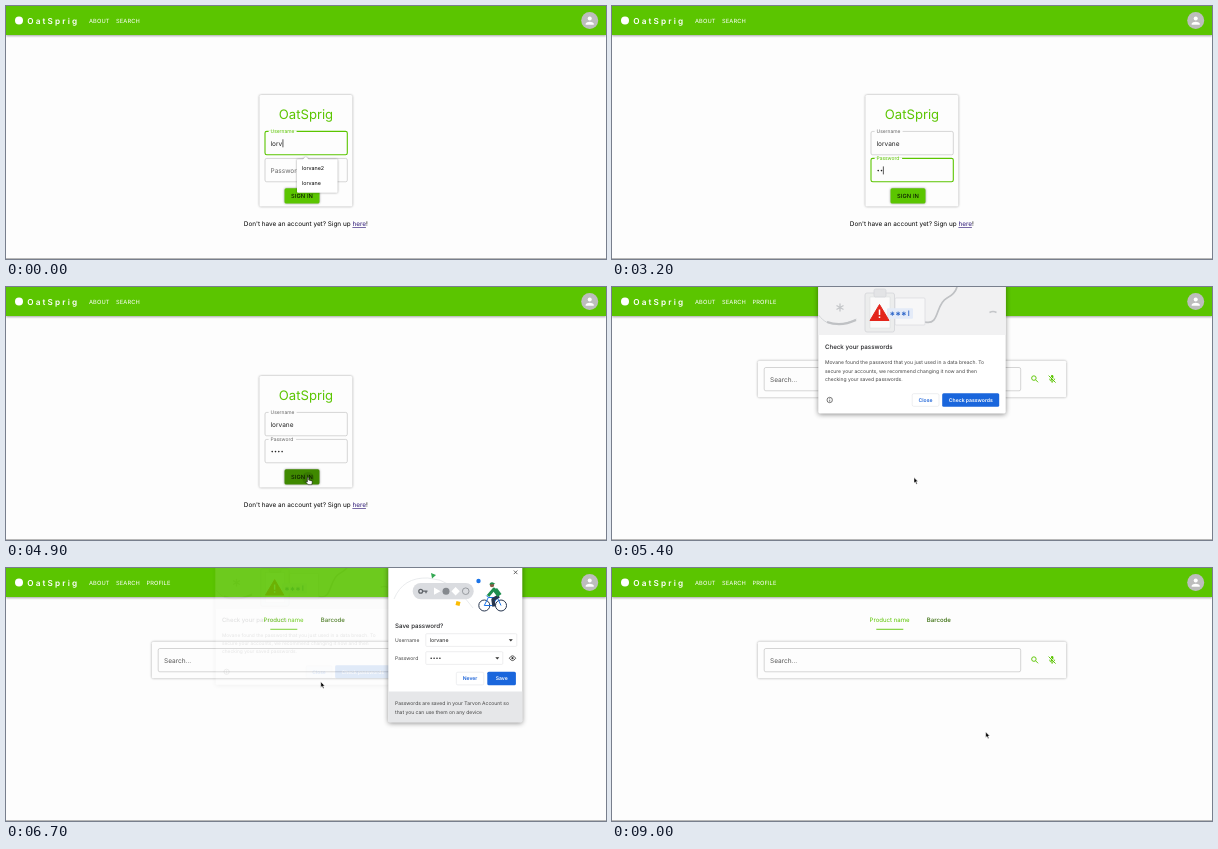
An HTML page that plays this animation: 600x253 px, repeating every 9.5 s.

```html
<!DOCTYPE html>
<html lang="en">
<head>
<meta charset="utf-8">
<title>Sign in</title>
<style>
  html, body { margin: 0; width: 100%; height: 100%; overflow: hidden; background: #fdfdfd; }
  svg {
    display: block; width: 100vw; height: 100vh; text-rendering: geometricPrecision;
    font: 400 6.5px Inter, "Liberation Sans", sans-serif;
  }
  .card { fill: #fdfdfd; filter: drop-shadow(0 .9px .8px rgba(0, 0, 0, .38)); }
  .pop { fill: #fff; filter: drop-shadow(0 1px 2.5px rgba(0, 0, 0, .45)); }
  .hint { filter: drop-shadow(0 .5px 1px rgba(0, 0, 0, .4)); }
  .box { fill: none; stroke: #b9b9b9; stroke-width: .6; }
  .line { stroke: #e2e3e5; }
  .nav { font-size: 5.74px; fill: #fff; letter-spacing: .1px; }
  .label { font-size: 4.92px; fill: #666; }
  .tab { font-size: 6.05px; }
  .small { font-size: 5.02px; fill: #444; }
  .btn { font-size: 5.1px; font-weight: 600; text-anchor: middle; fill: #1a62d8; }
  .on { fill: #fff; }
  .ttl { font-size: 6.2px; font-weight: 500; fill: #202124; }
  .icon { fill: none; stroke: #5bc500; stroke-width: 2.3; }
  .focus { stroke: #5bc500; stroke-width: 1.1; }
</style>
</head>
<body>
<svg viewBox="0 0 600 253" preserveAspectRatio="none">
  <rect width="600" height="253" fill="#fdfdfd"/>
  <rect y="252" width="600" height="1" fill="#b8b8b8"/>

  <rect width="600" height="29" fill="#5bc500" style="filter:drop-shadow(0 1px 1px rgba(0,0,0,.35))"/>
  <circle cx="13" cy="14.6" r="4" fill="#fff"/>
  <text x="21.2" y="17.6" fill="#fff" font-size="8.2" font-weight="600" letter-spacing="2.15">OatSprig</text>
  <g class="nav">
    <text x="83" y="16.8">ABOUT</text>
    <text x="110" y="16.8">SEARCH</text>
    <text id="profile" x="140.4" y="16.8">PROFILE</text>
  </g>
  <circle cx="583.7" cy="14.6" r="8.5" fill="#bdbdbd"/>
  <g transform="translate(577.6 8.5) scale(.51)" fill="#fff">
    <circle cx="12" cy="8" r="4"/>
    <path d="M12 14c-2.7 0-8 1.3-8 4v2h16v-2c0-2.7-5.3-4-8-4z"/>
  </g>

  <g id="login">
    <rect class="card" x="253.4" y="89" width="93" height="111.5" rx="1.5"/>
    <text x="300" y="113.2" text-anchor="middle" fill="#5bc500" font-size="13.1">OatSprig</text>

    <rect id="userBox" class="box" x="259" y="125.4" width="82.3" height="23.4" rx="1.7"/>
    <rect x="262.6" y="124.5" width="28" height="2" fill="#fdfdfd"/>
    <text id="userLabel" class="label" x="264.5" y="127.3">Username</text>
    <text id="user" x="264.5" y="139.8" fill="#222"></text>

    <rect id="passBox" class="box" x="259" y="152.4" width="82.3" height="23.4" rx="1.7"/>
    <rect id="notch" x="262.6" y="151.5" width="27.5" height="2" fill="#fdfdfd"/>
    <text id="passLabel" class="label" x="264.5">Password</text>
    <g id="dots" fill="#222"></g>
    <rect id="caret" width=".7" height="8" fill="#111"/>

    <rect id="sign" x="278.5" y="182.2" width="35" height="15.4" rx="1.7" style="filter:drop-shadow(0 .8px .8px rgba(0,0,0,.4))"/>
    <circle id="ripple" cx="302" cy="191" r="5" fill="#235500" opacity="0"/>
    <text x="296" y="192" text-anchor="middle" font-size="5.74" font-weight="500" letter-spacing=".12" fill="#0c1a00">SIGN IN</text>
    <text x="237.8" y="220" font-size="6.4">Don't have an account yet? Sign up <tspan fill="#2f1a78" text-decoration="underline">here</tspan>!</text>

    <g id="hints">
      <path class="pop hint" d="M292 153.3h5l2.8-2.6 2.8 2.6h28a1 1 0 0 1 1 1v31.4a1 1 0 0 1-1 1h-38.600a1 1 0 0 1-1-1v-31.400a1 1 0 0 1 1-1z"/>
      <text x="296" y="164.3" font-size="5.35">lorvane2</text>
      <text x="296" y="179.3" font-size="5.35">lorvane</text>
    </g>
  </g>

  <g id="search">
    <text class="tab" x="257.6" y="53.9" fill="#5bc500">Product name</text>
    <text class="tab" x="314.8" y="53.9" fill="#356b08" font-weight="500">Barcode</text>
    <rect x="264.3" y="60.8" width="27" height=".9" fill="#5bc500"/>
    <rect class="card" x="145.8" y="73.8" width="308.4" height="36.4" rx="1.5"/>
    <rect class="box" x="152.2" y="80.5" width="256.5" height="23.3" rx="1.7"/>
    <text x="158" y="94.6" fill="#555">Search...</text>
    <g class="icon" transform="translate(418 87.2) scale(.41)">
      <circle cx="9.5" cy="9.5" r="5.5"/>
      <path d="M13.7 13.7l6 6"/>
    </g>
    <g class="icon" transform="translate(435.2 87.2) scale(.41)">
      <rect x="9" y="2" width="6" height="13" rx="3" fill="#5bc500" stroke="none"/>
      <path d="M6 11a6 6 0 0 0 12 0M12 17v4"/>
      <path d="M4.6 2.6l16 16" stroke="#fdfdfd"/>
      <path d="M3.5 3.5l17 17"/>
    </g>
  </g>

  <g id="dialog">
    <path class="pop" d="M206.3 -4h187.4v128.800a1.600 1.600 0 0 1-1.600 1.600h-184.200a1.600 1.600 0 0 1-1.600-1.600z"/>
    <rect x="206.3" y="-4" width="187.4" height="52" fill="#f1f1f2"/>
    <g fill="none" stroke="#d3d5d8">
      <path d="M206.5 28c10 13 22 11 38 4"/>
      <path d="M215 35q14 5 29-2" stroke="#bfc1c4" stroke-width="2.2"/>
      <path d="M313 35c15 4 10-18 22-24q8-4 10-11" stroke="#bfc1c4" stroke-width="1.7"/>
      <path d="M228 16.5v8M224.5 18.5l7 4M231.5 18.5l-7 4" stroke="#c4c6c9" stroke-width="1.3"/>
      <path d="M377.5 25.5q3.5-2 7 0" stroke="#c4c6c9" stroke-width="1.5"/>
      <rect x="283" y="11" width="30" height="27" rx="1" fill="#f7f7f8" stroke-width=".6"/>
      <rect x="253" y="6" width="29.5" height="39" rx="2" fill="#eceded" stroke-width=".8"/>
      <rect x="258" y="10" width="20" height="31" fill="#fafafa" stroke-width=".4"/>
      <rect x="262" y="2" width="12" height="8" rx="1.5" fill="#e3e4e6" stroke-width=".7"/>
    </g>
    <rect x="275" y="21.3" width="26" height="10.4" rx="1" fill="#e4ebf8"/>
    <text x="277.5" y="32" font-size="10.2" font-weight="700" fill="#2f67c9">***</text>
    <rect x="296.3" y="23.5" width=".9" height="5.5" fill="#2f67c9"/>
    <path d="M267.5 17.5l9.5 16h-19z" fill="#e3261c" stroke="#e3261c" stroke-linejoin="round"/>
    <path d="M267.5 22.5v5.5M267.5 29.6v1.5" stroke="#fff" stroke-width="1.5"/>
    <text class="ttl" x="212.9" y="61.6">Check your passwords</text>
    <g class="small">
      <text x="212.9" y="77">Movane found the password that you just used in a data breach. To</text>
      <text x="212.9" y="85.5">secure your accounts, we recommend changing it now and then</text>
      <text x="212.9" y="94">checking your saved passwords.</text>
    </g>
    <circle cx="217.7" cy="113" r="2.7" fill="none" stroke="#444" stroke-width=".7"/>
    <path d="M217.7 111.3v.8M217.7 112.7v2" stroke="#444" stroke-width=".7"/>
    <rect id="close" x="300.2" y="106.7" width="26.8" height="12.6" rx="1.5" fill="#fff" stroke="#dadce0" stroke-width=".5"/>
    <text class="btn" x="313.5" y="114.9">Close</text>
    <rect x="330.2" y="106.2" width="57" height="13.6" rx="1.5" fill="#1a66dc"/>
    <text class="btn on" x="358.8" y="114.9">Check passwords</text>
  </g>

  <g id="bubble">
    <path class="pop" d="M382.3 -4h134v156.800a1.500 1.500 0 0 1-1.500 1.500h-131a1.500 1.500 0 0 1-1.500-1.500z"/>
    <path d="M382.3 123.5h134v29.300a1.500 1.500 0 0 1-1.500 1.500h-131a1.500 1.500 0 0 1-1.500-1.500z" fill="#e6e7e9"/>
    <path d="M507.8 2.5l3.6 3.6m0-3.6l-3.6 3.6" stroke="#444" stroke-width=".8"/>
    <path d="M388 31q9-22 34-21 25 1 45 30" fill="none" stroke="#e4e6e9" stroke-width=".8"/>
    <rect x="406.7" y="15" width="61" height="16.3" rx="8.1" fill="#dadce0"/>
    <g fill="none" stroke="#5f6368" stroke-width="1.3">
      <circle cx="414.7" cy="23.2" r="1.9"/>
      <path d="M416.5 23.2h5M420 23v2.3"/>
      <circle cx="459.7" cy="23.2" r="3.3" stroke="#888c91" stroke-width=".8"/>
    </g>
    <path d="M428 19.6l6.5 3.6-6.5 3.6zM449.6 19l4.2 4.2-4.2 4.2-4.2-4.2z" fill="#fff"/>
    <circle cx="440" cy="23.2" r="3.5" fill="#85898e"/>
    <path d="M425 5l5 2-4 3.5z" fill="#34a853"/>
    <circle cx="472.5" cy="13" r="2.2" fill="#1a73e8"/>
    <path d="M450.5 33l4 1-1 4-4-1z" fill="#fbbc04"/>
    <g fill="none" stroke="#27364f" stroke-linejoin="round">
      <circle cx="478.3" cy="37.5" r="5.5"/>
      <circle cx="495" cy="37.5" r="5.5"/>
      <path d="M478.3 37.5l4-8h9l-5 8zM482.3 29.5l-2-2M491.3 29.5l3.7 8" stroke="#1a73e8"/>
      <path d="M493 28l-6 3.500 1 7" stroke-width="3.4"/>
      <path d="M493 27l-5-6-6 7" stroke="#1e8e4e" stroke-width="3"/>
      <path d="M493.5 27.500l-4.500-6" stroke="#1e8e4e" stroke-width="5"/>
    </g>
    <circle cx="486" cy="17" r="2.200" fill="#8a5a44"/>
    <path d="M483.2 16.600q2-4.600 6.200-.6z" fill="#1e8e4e"/>

    <text class="ttl" x="389" y="59.5">Save password?</text>
    <g class="small">
      <text x="389" y="74">Username</text>
      <text x="389" y="92">Password</text>
      <text x="389" y="137">Passwords are saved in your Tarvon Account so</text>
      <text x="389" y="145.5">that you can use them on any device</text>
    </g>
    <rect class="box line" x="419.8" y="65.7" width="91" height="12.7" rx="1"/>
    <rect class="box line" x="419.8" y="83.7" width="77" height="12.7" rx="1"/>
    <text x="423.8" y="74" font-size="5.3" fill="#222">lorvane</text>
    <g id="saved" fill="#222"></g>
    <path d="M502.8 71.2h4l-2 2.2zM489.3 89.2h4l-2 2.2z" fill="#333"/>
    <path d="M503.3 90.2q3.200-4.800 6.400 0-3.200 4.800-6.400 0z" fill="none" stroke="#333" stroke-width=".8"/>
    <circle cx="506.5" cy="90.2" r="1.1" fill="#333"/>
    <rect id="never" x="450.3" y="104.2" width="27.5" height="12.7" rx="1.5" fill="#fff" stroke="#dadce0" stroke-width=".5"/>
    <text class="btn" x="464" y="112.4">Never</text>
    <rect x="481.3" y="103.7" width="28.6" height="13.6" rx="1.5" fill="#1a66dc"/>
    <text class="btn on" x="495.7" y="112.4">Save</text>
  </g>

  <g id="cursor" stroke-linejoin="round" stroke-width=".5">
    <path id="arrow" d="M0 0v5.6l1.3-1.2 1 2.3 1-.4-1-2.2h1.7z" fill="#000" stroke="#fff"/>
    <path id="hand" d="M-.6 0q.7-.7 1.3 0v2.6l3 .8q.8.3.6 1.2l-.6 2.6h-3.600l-2.200-2.600q0-1 1-.5l.5.5z" fill="#fff" stroke="#000"/>
  </g>
</svg>
<script>
const LOOP = 9500, STEP = 100, GREEN = '#5bc500';
const $ = id => document.getElementById(id);
const set = (id, attrs) => { for (const k in attrs) $(id).setAttribute(k, attrs[k]); };
const show = (id, on) => set(id, { opacity: +on });
const within = (t, a, b) => t >= a && t < b;
const mix = (a, b, p) => a + (b - a) * p;
const ease = p => p * p * (3 - 2 * p);

const TYPED = [[0, 'lorv'], [500, 'lorva'], [1000, 'lorvan'], [1200, 'lorvane']];
const DOTS = [[0, 0], [2900, 1], [3200, 2], [3400, 3], [3600, 4]];
// time, x, y of the pointer tip
const PATH = [
  [3800, 318, 143], [4300, 306, 179], [4500, 306, 179], [4700, 302, 190.5],
  [5500, 302, 190.5], [6300, 314.8, 113.8], [6700, 314.8, 113.8],
  [7400, 463, 109], [7600, 463, 109], [8200, 373.7, 164]
];
// opacity of the overlays, held from each time on
const DIALOG = [[0, 0], [5300, .6], [5400, 1], [6600, .55], [6700, .12], [6800, 0]];
const BUBBLE = [[0, 0], [6600, .6], [6700, 1], [7600, .4], [7700, 0]];
const FLOAT = [[0, 0], [1900, .3], [2000, .8], [2100, 1]];

const held = (table, t) => table.filter(r => r[0] <= t).pop()[1];

function pointer(t) {
  const i = PATH.findIndex(p => p[0] > t);
  if (i < 0) return PATH[PATH.length - 1].slice(1);
  if (i === 0) return PATH[0].slice(1);
  const [a, b] = [PATH[i - 1], PATH[i]];
  const p = ease((t - a[0]) / (b[0] - a[0]));
  return [mix(a[1], b[1], p), mix(a[2], b[2], p)];
}

function addDots(id, x, y, gap) {
  let s = '';
  for (let i = 0; i < 4; i++) s += `<circle cx="${x + gap * i}" cy="${y}" r=".8"/>`;
  $(id).innerHTML = s;
}

function drawLogin(t) {
  const onUser = t < 1900, onPass = within(t, 1900, 4800);
  $('user').textContent = held(TYPED, t);
  $('userBox').classList.toggle('focus', onUser);
  $('passBox').classList.toggle('focus', onPass);
  $('userLabel').style.fill = onUser ? GREEN : '#666';

  const f = held(FLOAT, t);
  set('passLabel', { y: mix(166.6, 154.3, f) });
  $('passLabel').style.fontSize = mix(6.5, 4.92, f) + 'px';
  $('passLabel').style.fill = onPass ? GREEN : '#666';
  show('notch', f > .5);

  const n = held(DOTS, t);
  [...$('dots').children].forEach((d, i) => d.setAttribute('opacity', +(i < n)));
  show('caret', t < 4800 && !within(t, 2700, 2900) && !within(t, 4200, 4700));
  set('caret', onUser
    ? { x: 264.9 + $('user').getComputedTextLength(), y: 133.3 }
    : { x: 264.5 + n * 3.2, y: 160.4 });
  show('hints', t < 1800);

  set('sign', { fill: t < 4600 ? GREEN : '#3f8900' });
  set('ripple', { opacity: within(t, 4800, 5100) ? .3 : 0, r: within(t, 4800, 4900) ? 3 : 6 });
}

function draw(t) {
  const home = t >= 5100;
  show('login', !home);
  show('search', home);
  show('profile', home);
  if (!home) drawLogin(t);

  const k = t < 6600 ? 1 : t < 6700 ? .985 : .965;
  set('dialog', {
    opacity: held(DIALOG, t),
    transform: `translate(${300 * (1 - k)} ${-150 * (1 - k)}) scale(${k})`
  });
  set('bubble', { opacity: held(BUBBLE, t) });
  set('close', { fill: t >= 6200 ? '#f3f7fe' : '#fff' });
  set('never', { fill: t >= 7300 ? '#f3f7fe' : '#fff' });

  const [x, y] = pointer(t);
  const hand = !home && y > 182;
  show('cursor', t >= 3800);
  set('cursor', { transform: `translate(${x} ${y})` });
  show('hand', hand);
  show('arrow', !hand);
}

addDots('dots', 266.2, 164.6, 3.3);
addDots('saved', 425.2, 90.2, 2.9);
const start = performance.now();
function tick() {
  const t = (performance.now() - start) % LOOP;
  draw(Math.floor(t / STEP) * STEP);
  requestAnimationFrame(tick);
}
tick();
</script>
</body>
</html>
```
